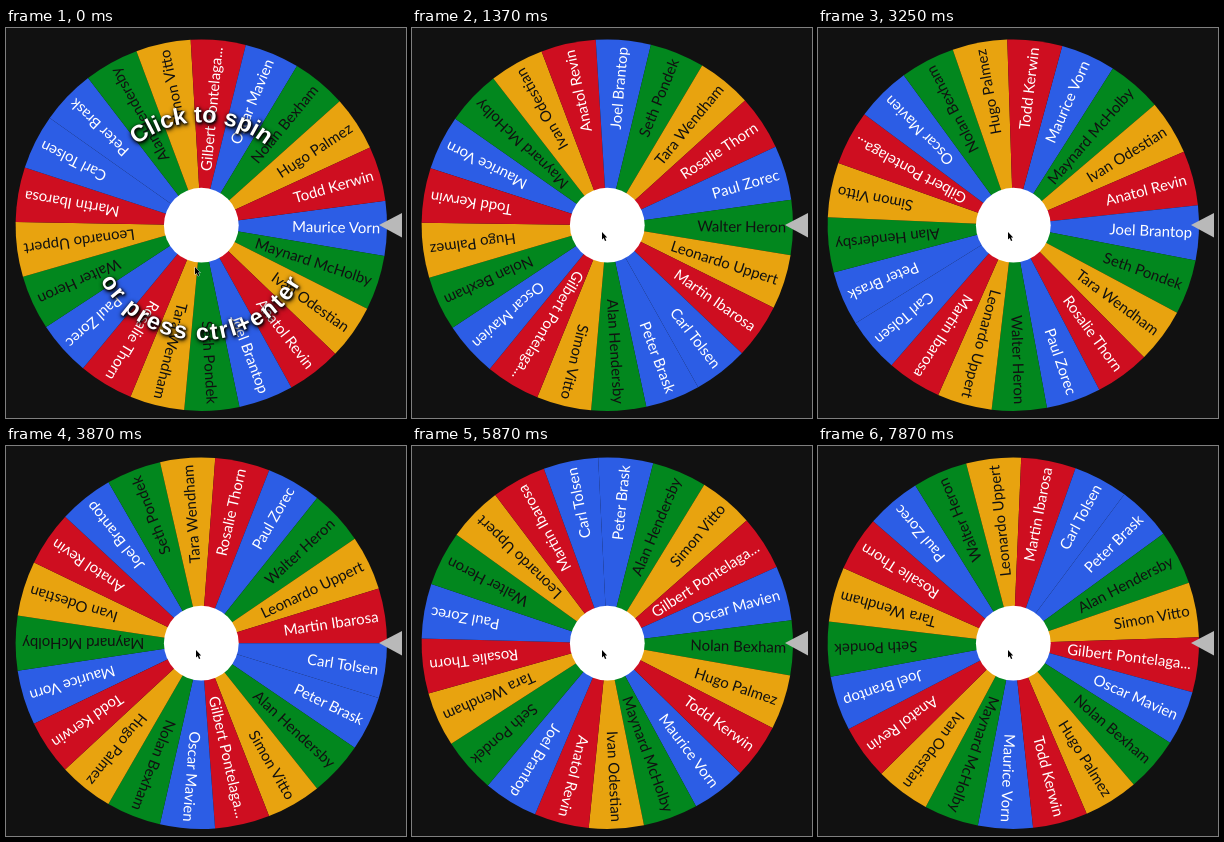
Recreate the animation shown at these times as an HTML page. Size 400 px wide and 390 px high, loop 8 s.

```html
<!DOCTYPE html>
<html lang="en">
<head>
<meta charset="utf-8">
<title>Name wheel</title>
<style>
  html, body { margin: 0; width: 100%; height: 100%; overflow: hidden; background: #111; }
  svg { display: block; width: 400px; height: 390px; }
  .name { font: 15px Lato, "Open Sans", sans-serif; text-anchor: end; }
  #hint { font: bold 23.5px "Liberation Sans", Arial, sans-serif; fill: #fff; text-anchor: middle;
    filter: drop-shadow(1px 1px 1px #000) drop-shadow(0 1px 2px #000); }
</style>
</head>
<body>
<svg viewBox="0 0 400 390">
  <defs>
    <path id="top" d="M-103 0A103 103 0 0 1 103 0"/>
    <path id="bottom" d="M-115 0A115 115 0 0 0 115 0"/>
  </defs>
  <g transform="translate(195.3 197.2)">
    <g id="wheel"></g>
    <circle r="37.4" fill="#fff"/>
    <g id="hint">
      <text><textPath href="#top" startOffset="50%">Click to spin</textPath></text>
      <text letter-spacing="2"><textPath href="#bottom" startOffset="50%">or press ctrl+enter</textPath></text>
    </g>
  </g>
  <path d="M373 197L396 185V209.500Z" fill="#b9b9b9"/>
  <path id="cursor" d="M0 0V7.500L1.700 6 3 9 4.300 8.400 3 5.600H5.200Z" stroke="#fff" stroke-width=".8" paint-order="stroke"/>
</svg>
<script>
const names = ["Maurice Vorn", "Maynard McHolby", "Ivan Odestian", "Anatol Revin", "Joel Brantop",
  "Seth Pondek", "Tara Wendham", "Rosalie Thorn", "Paul Zorec", "Walter Heron", "Leonardo Uppert",
  "Martin Ibarosa", "Carl Tolsen", "Peter Brask", "Alan Hendersby", "Simon Vitto",
  "Gilbert Pontelaga...", "Oscar Mavien", "Nolan Bexham", "Hugo Palmez", "Todd Kerwin"];
const colors = ["#2c5de5", "#02871e", "#e8a30f", "#ce0e20"];
const inks = ["#fff", "#111", "#111", "#fff"];
const FIRST = 13; // entry where the colour cycle restarts
const RADIUS = 185.7, STEP = 360 / names.length;
const LOOP = 8000, FRAME = 125;
const START = 0.5995, ACCEL = 1.0915, PEAK = START + ACCEL; // seconds
const IDLE_SPEED = 17, MAX_SPEED = 2041.7, DECAY = 0.922; // degrees per second

const byId = id => document.getElementById(id);
const wheel = byId("wheel"), hint = byId("hint"), cursor = byId("cursor");

const half = STEP / 2 * Math.PI / 180;
const x = RADIUS * Math.cos(half), y = RADIUS * Math.sin(half);
wheel.innerHTML = names.map((name, i) => {
  const c = (i < FIRST ? i : i - FIRST) % 4;
  return `<g transform="rotate(${i * STEP})">
    <path d="M0 0L${x} ${-y}A${RADIUS} ${RADIUS} 0 0 1 ${x} ${y}Z" fill="${colors[c]}"/>
    <text class="name" x="179" y="5" fill="${inks[c]}">${name}</text></g>`;
}).join("");

// Slow idle turn, steady acceleration, then exponential slowdown
function angle(t) {
  const idle = 1 + IDLE_SPEED * Math.min(t, START);
  const u = Math.min(Math.max(t - START, 0), ACCEL);
  const coast = Math.max(t - PEAK, 0);
  return idle + MAX_SPEED * u * u / (2 * ACCEL)
    + MAX_SPEED / DECAY * (1 - Math.exp(-DECAY * coast));
}

function draw(now) {
  const step = Math.floor((now % LOOP + 5) / FRAME) % (LOOP / FRAME);
  const t = Math.floor(step * FRAME / 10) / 100;
  wheel.setAttribute("transform", `rotate(${angle(t) % 360})`);
  hint.style.display = t < START ? "" : "none";
  const p = Math.min(Math.max((t - 0.1) / 0.4, 0), 1);
  const ease = p * p * (3 - 2 * p);
  cursor.setAttribute("transform", `translate(${189 + ease} ${239 - 35 * ease})`);
}

const begin = performance.now();
function tick() {
  draw(performance.now() - begin);
  requestAnimationFrame(tick);
}
tick();
</script>
</body>
</html>
```
